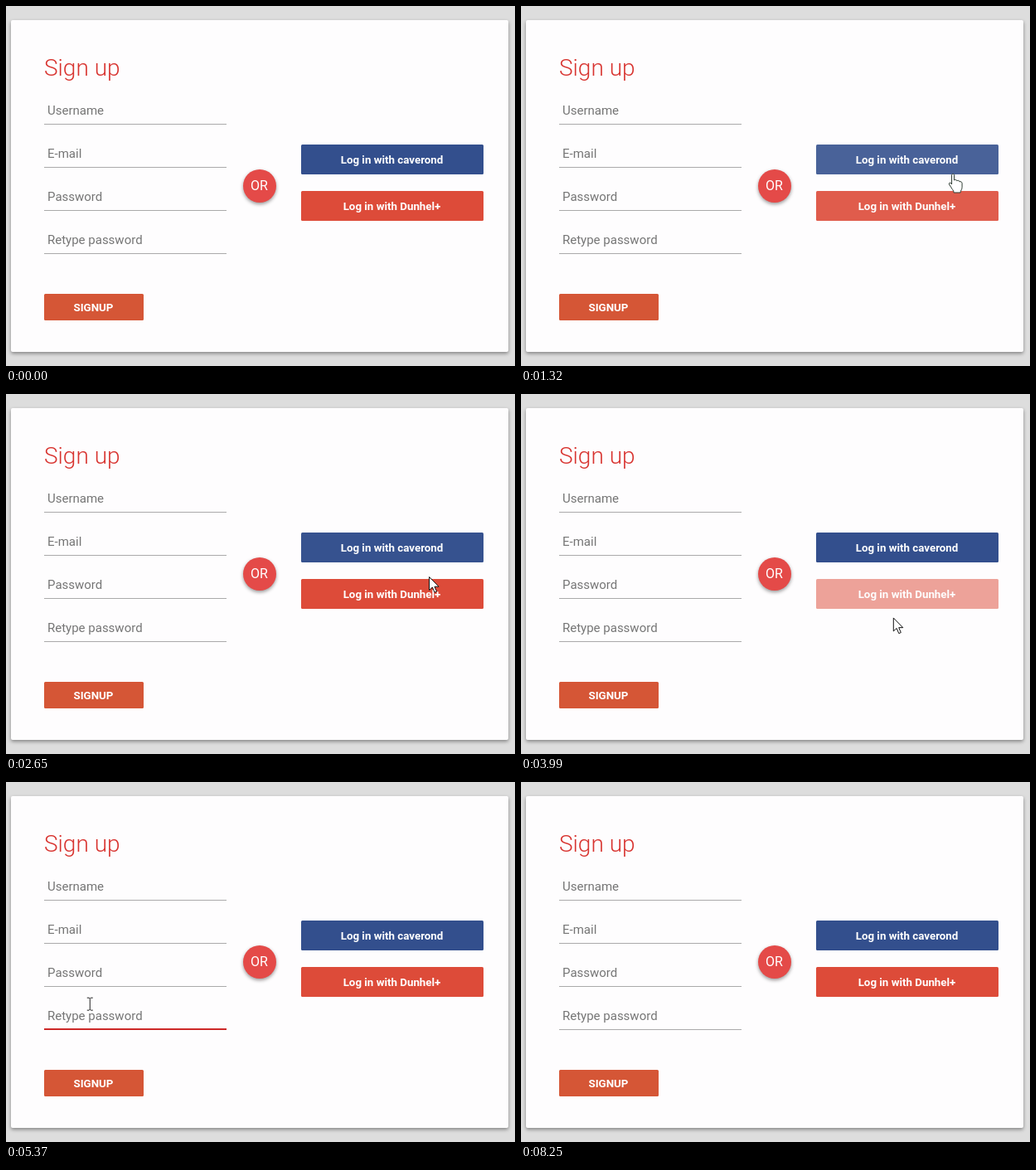
An HTML page for the animation above (8.33 s loop, 614x434 px).

```html
<!DOCTYPE html>
<html lang="en">
<head>
<meta charset="utf-8">
<title>Sign up form</title>
<style>
  html, body { margin: 0; width: 100%; height: 100%; overflow: hidden; background: #ddd; }
  svg { display: block; width: 614px; height: 434px; font-family: Roboto, sans-serif; }
  .raised { filter: drop-shadow(0 2px 2px rgba(0, 0, 0, .4)); }
  .label { font-size: 15px; fill: #757575; }
  .button text { font-size: 13.33px; font-weight: 700; fill: #fff; text-anchor: middle; }
  .glow { fill: #ff0; opacity: .55; }
  .arrow, .hand { fill: #fff; stroke: #111; stroke-linejoin: round; }
  .hand { stroke: #2c3a30; }
  .beam { fill: none; stroke: #222; }
</style>
</head>
<body>
<svg viewBox="0 0 614 434">
  <rect class="raised" x="6" y="17" width="600" height="400" rx="2" fill="#fefdfe"/>
  <text x="46" y="84" font-size="28" font-weight="300" fill="#d8332f">Sign up</text>
  <g id="fields"></g>
  <g class="button">
    <rect x="46" y="347" width="120" height="32" rx="1.5" fill="#d55636"/>
    <text x="105.5" y="368">SIGNUP</text>
  </g>
  <circle class="raised" cx="306" cy="217" r="20" fill="#e44a48"/>
  <text x="305.5" y="222" font-size="16" fill="#fff" text-anchor="middle">OR</text>
  <g class="button" id="blue">
    <rect x="356" y="167" width="220" height="36" rx="1.5" fill="#334f8d"/>
    <text x="465.5" y="190">Log in with caverond</text>
  </g>
  <g class="button" id="red">
    <rect x="356" y="223" width="220" height="36" rx="1.5" fill="#dd4b39"/>
    <text x="465.5" y="246">Log in with Dunhel+</text>
  </g>
  <rect id="caret" x="50" width="1" height="18" fill="#111"/>
  <g id="cursor">
    <path class="arrow" d="M0 .5V16.5L3.8 13 6.5 19.2 9 18.1 6.4 12.2H11.5Z"/>
    <path class="hand" d="M-1.5 1.5C-1.5-.5 1.5-.5 1.5 1.5V7.5C2.5 6.6 4.6 6.8 4.8 8.4 5.6 7.4 7.8 7.8 8 9.4 9 8.8 11 9.4 11 11.3V16C11 19 9 20 9 22.5H1C1 20-1 18.5-2 16.5L-4.6 12.5C-5.2 11-3.5 10-2.5 11L-1.5 12.5Z"/>
    <path class="beam" d="M-3.5-7.5H-1L0-6.5 1-7.5H3.5M0-6.5V6.5M-3.5 7.5H-1L0 6.5 1 7.5H3.5"/>
    <circle class="glow" cx="-2" cy="-1" r="12"/>
  </g>
</svg>
<script>
const LOOP = 8330;
const FADE = 200;
const BLINK = 535;
const CLICK = 80;

// Pointer strokes; each sets off where the one before ended
const OFFSTAGE = [582, 489];
const STROKES = [
  { start: 850, end: 1640, steps: 11, to: [518, 188], slow: 3 },
  { start: 2500, end: 2880, steps: 6, to: [504, 248], slow: 1.1 },
  { start: 3990, end: 4440, steps: 7, to: [102.5, 294], slow: .95, sag: 35 },
  { start: 4520, end: 4760, steps: 4, to: [102.5, 286], slow: 3 },
  { start: 5310, end: 5700, steps: 6, to: [98.5, 226], slow: 2 },
  { start: 7240, end: 7490, steps: 4, to: [432, 469], slow: 1 }
];

const HOVER = { blue: [[1290, 2500]], red: [[1100, 1224], [2680, 3985]] };
const FOCUS = [{ field: 3, from: 4683, to: 6310 }, { field: 2, from: 6310, to: 8250 }];

const $ = sel => document.querySelector(sel);
const show = (el, on) => { el.style.display = on ? '' : 'none'; };
const lineY = i => 142 + 52 * i;

const lines = ['Username', 'E-mail', 'Password', 'Retype password'].map((name, i) => {
  const add = (tag, attrs) => {
    const el = document.createElementNS('http://www.w3.org/2000/svg', tag);
    for (const key in attrs) el.setAttribute(key, attrs[key]);
    return $('#fields').appendChild(el);
  };
  add('text', { class: 'label', x: 50, y: lineY(i) - 11 }).textContent = name;
  return add('rect', { x: 46, width: 220 });
});

// The CSS "ease" curve
function ease(p) {
  if (p <= 0) return 0;
  if (p >= 1) return 1;
  const bezier = (s, a, b) => 3 * s * (1 - s) ** 2 * a + 3 * s * s * (1 - s) * b + s ** 3;
  let lo = 0, hi = 1;
  for (let i = 0; i < 20; i++) {
    const mid = (lo + hi) / 2;
    if (bezier(mid, .25, .25) < p) lo = mid; else hi = mid;
  }
  return bezier(lo, .1, 1);
}

// Pointer position and the time of the latest visible step
function sample(t) {
  const i = STROKES.filter(s => t >= s.start).length - 1;
  if (i < 0) return { now: 0, x: OFFSTAGE[0], y: OFFSTAGE[1] };
  const { start, end, steps, to, slow, sag = 0 } = STROKES[i];
  const from = i ? STROKES[i - 1].to : OFFSTAGE;
  const gap = (end - start) / (steps - 1);
  const step = Math.min(steps - 1, Math.floor((t - start + 14) / gap));
  const k = (step + 1) / steps;
  const left = (1 - k) ** slow;
  const mix = axis => to[axis] + (from[axis] - to[axis]) * left;
  return { now: start + step * gap, x: mix(0), y: mix(1) + sag * Math.sin(Math.PI * k) };
}

function kindAt(x, y) {
  const inside = (left, top, height) => x >= left && x < left + 220 && y >= top && y < top + height;
  if (inside(356, 167, 36) || inside(356, 223, 36)) return 'hand';
  return inside(46, 108, 192) ? 'beam' : 'arrow';
}

function draw(t) {
  const { now, x, y } = sample(t);

  for (const id in HOVER) {
    const level = HOVER[id].reduce((sum, [a, b]) => sum + ease((now - a) / FADE) - ease((now - b) / FADE), 0);
    $('#' + id).style.opacity = 1 - level / 2;
  }

  const focus = FOCUS.find(f => t >= f.from && t < f.to);
  const age = focus ? t - focus.from : Infinity;
  lines.forEach((line, i) => {
    const on = focus && focus.field === i;
    line.setAttribute('y', lineY(i) - (on ? 1 : 0));
    line.setAttribute('height', on ? 2 : 1);
    line.setAttribute('fill', on ? '#cc2828' : '#aaa');
  });
  show($('#caret'), focus && Math.floor(age / BLINK) % 2 === 0);
  if (focus) $('#caret').setAttribute('y', lineY(focus.field) - 25);

  const kind = kindAt(x, y);
  $('#cursor').setAttribute('transform', `translate(${x} ${y})`);
  for (const name of ['arrow', 'hand', 'beam']) show($('.' + name), name === kind);
  show($('.glow'), age < CLICK);
}

const begin = performance.now();
function tick() {
  draw((performance.now() - begin) % LOOP);
  requestAnimationFrame(tick);
}
tick();
</script>
</body>
</html>
```
